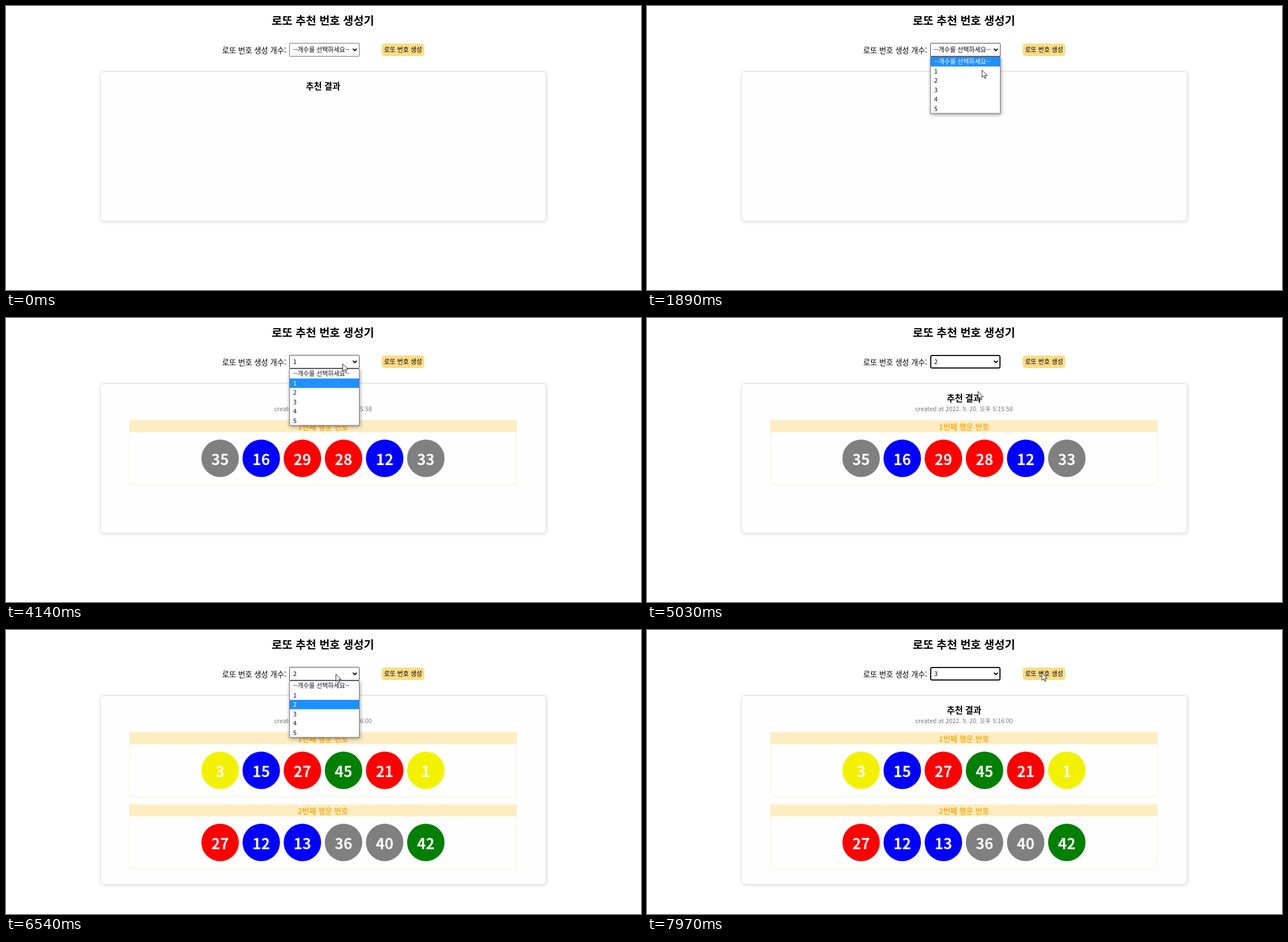
Animation of 1119 by 500 pixels, one loop 8 s. Source, as an HTML page:

```html
<!DOCTYPE html>
<html lang="ko">
<head>
<meta charset="utf-8">
<title>로또 추천 번호 생성기</title>
<style>
html, body { margin: 0; width: 100%; height: 100%; overflow: hidden; background: #fff; }
svg { display: block; font: 11px "Noto Sans CJK KR", "Noto Sans", sans-serif; }
.mid { text-anchor: middle; }
.bold { font-weight: bold; }
#card { fill: #fefefe; stroke: #e0e0e0; filter: drop-shadow(1.6px 1.6px 3px rgba(0,0,0,.14)); }
#popup { filter: drop-shadow(1px 2px 3px rgba(0,0,0,.4)); }
</style>
</head>
<body>
<svg width="1119" height="500" viewBox="0 0 1119 500">
  <text class="mid bold" x="558.5" y="33" font-size="19.8">로또 추천 번호 생성기</text>
  <text x="381" y="82.5" font-size="13.3">로또 번호 생성 개수:</text>
  <rect x="662" y="66" width="75" height="22" rx="5" fill="#fddb86"/>
  <text class="mid" x="699.7" y="81">로또 번호 생성</text>
  <rect id="card" x="166.5" y="115.5" width="785" rx="6"/>
  <text class="mid bold" x="558.7" y="147" font-size="15.4">추천 결과</text>
  <g id="results"></g>
  <rect id="box" fill="#fff"/>
  <text id="value" x="506" y="81"></text>
  <path d="M611.3 75.2l3.4 3.4 3.4-3.4" fill="none" stroke="#000" stroke-width="1.9"/>
  <g id="popup">
    <rect x="499.5" y="89.5" width="123" height="99.5" fill="#fff" stroke="#767676"/>
    <rect id="light" x="500" width="122" height="16.5" fill="#1e90ff"/>
    <g id="options"></g>
  </g>
  <path id="cursor" d="M.4 .6V13.6l3-2.7 2.1 4.7 2-.9-2.1-4.6h4.2z" fill="#fff" stroke="#111" stroke-width=".9"/>
</svg>
<script>
const $ = id => document.getElementById(id);
const LOOP = 8000, ROW = 16.5, TOP = 90, LAG = 100;
const labels = ["--개수를 선택하세요--", "1", "2", "3", "4", "5"];
const colors = ["#f2f200", "#00f", "#f00", "#808080", "#008000"];

// each round opens the list, picks one more than before, then clicks the button
const rounds = [
  { open: 1400, pick: 2430, click: 2970, time: "5:15:58", rows: [[35, 16, 29, 28, 12, 33]] },
  { open: 4000, pick: 4960, click: 5630, time: "5:16:00",
    rows: [[3, 15, 27, 45, 21, 1], [27, 12, 13, 36, 40, 42]] },
  { open: 6450, pick: 7340, click: LOOP }
];

// pointer stops: select box, list row, button
const stops = [{ to: 200, x: 1050, y: 505 }, { to: 1060, x: 606, y: 114 }];
rounds.forEach(({ open, pick, click }, k) => {
  const n = k + 1;
  stops.push(
    { from: open - 140, to: open + 140, x: 617 - 12 * n, y: 86 - 3 * n },
    { from: open + 400 + 100 * n, to: pick + 70, x: 597 - 7 * n, y: TOP + ROW * (n + .35) },
    { from: pick + 400, to: click + 400, x: 676 + 6.5 * n, y: 84 - 3 * n });
});

function pointer(t) {
  const i = Math.max(1, stops.findIndex(s => s.to > t));
  const a = stops[i - 1], b = stops[i], end = b.from ?? b.to;
  const u = Math.min(1, Math.max(0, (t - a.to) / (end - a.to)));
  const e = u * u * (3 - 2 * u);
  return [a.x + (b.x - a.x) * e, a.y + (b.y - a.y) * e];
}

$("options").innerHTML = labels.map((s, i) =>
  `<text x="506" y="${102 + i * ROW}">${s}</text>`).join("");

function ball(n, i) {
  const x = 377.3 + i * 72.5;
  return `<circle cx="${x}" cy="247" r="33" fill="${colors[Math.floor((n - 1) / 10)]}"/>
    <text class="mid bold" x="${x}" y="258.5" font-size="26.4" fill="#fff">${n}</text>`;
}

function group(row, i) {
  return `<g transform="translate(0 ${i * 127})">
    <rect x="218" y="180.5" width="681.5" height="113" fill="none" stroke="#fdf0cf"/>
    <rect x="217.5" y="180" width="682.5" height="21" fill="#feecc2"/>
    <text class="mid bold" x="558.6" y="196.5" font-size="13.3" fill="#f8b21c">${i + 1}번째 행운 번호</text>
    ${row.map(ball).join("")}</g>`;
}

let shown = -1;
function showResult(done) {
  if (done === shown) return;
  shown = done;
  const result = rounds[done - 1];
  $("card").setAttribute("height", done > 1 ? 332 : 263);
  $("results").innerHTML = result
    ? `<text class="mid" x="558.7" y="164" font-size="10.75" fill="#777">created at 2022. 9. 20. 오후 ${result.time}</text>`
      + result.rows.map(group).join("")
    : "";
}

function setBox(focused, open) {
  const w = focused ? 2 : 1;
  const attrs = {
    x: 499 + w / 2, y: 65 + w / 2, width: 124 - w, height: 24 - w, rx: w + .5,
    "stroke-width": w, stroke: focused ? "#101010" : open ? "#444" : "#707070"
  };
  for (const k in attrs) $("box").setAttribute(k, attrs[k]);
}

function draw(t) {
  const [x, y] = pointer(t), hoverY = pointer(t - LAG)[1];
  const picked = rounds.filter(r => t >= r.pick).length;
  const done = rounds.filter(r => t >= r.click).length;
  const open = rounds.some(r => t >= r.open && t < r.pick);

  showResult(done);
  $("value").textContent = labels[picked];
  setBox(!open && picked > done, open);
  $("popup").style.display = open ? "" : "none";

  const hover = hoverY < TOP ? picked : Math.floor((hoverY - TOP) / ROW);
  $("light").setAttribute("y", TOP + hover * ROW);
  [...$("options").children].forEach((o, i) =>
    o.setAttribute("fill", i === hover ? "#fff" : "#101020"));

  $("cursor").setAttribute("transform", `translate(${x} ${y})`);
}

const start = performance.now();
function frame() {
  draw((performance.now() - start) % LOOP);
  requestAnimationFrame(frame);
}
frame();
</script>
</body>
</html>
```
